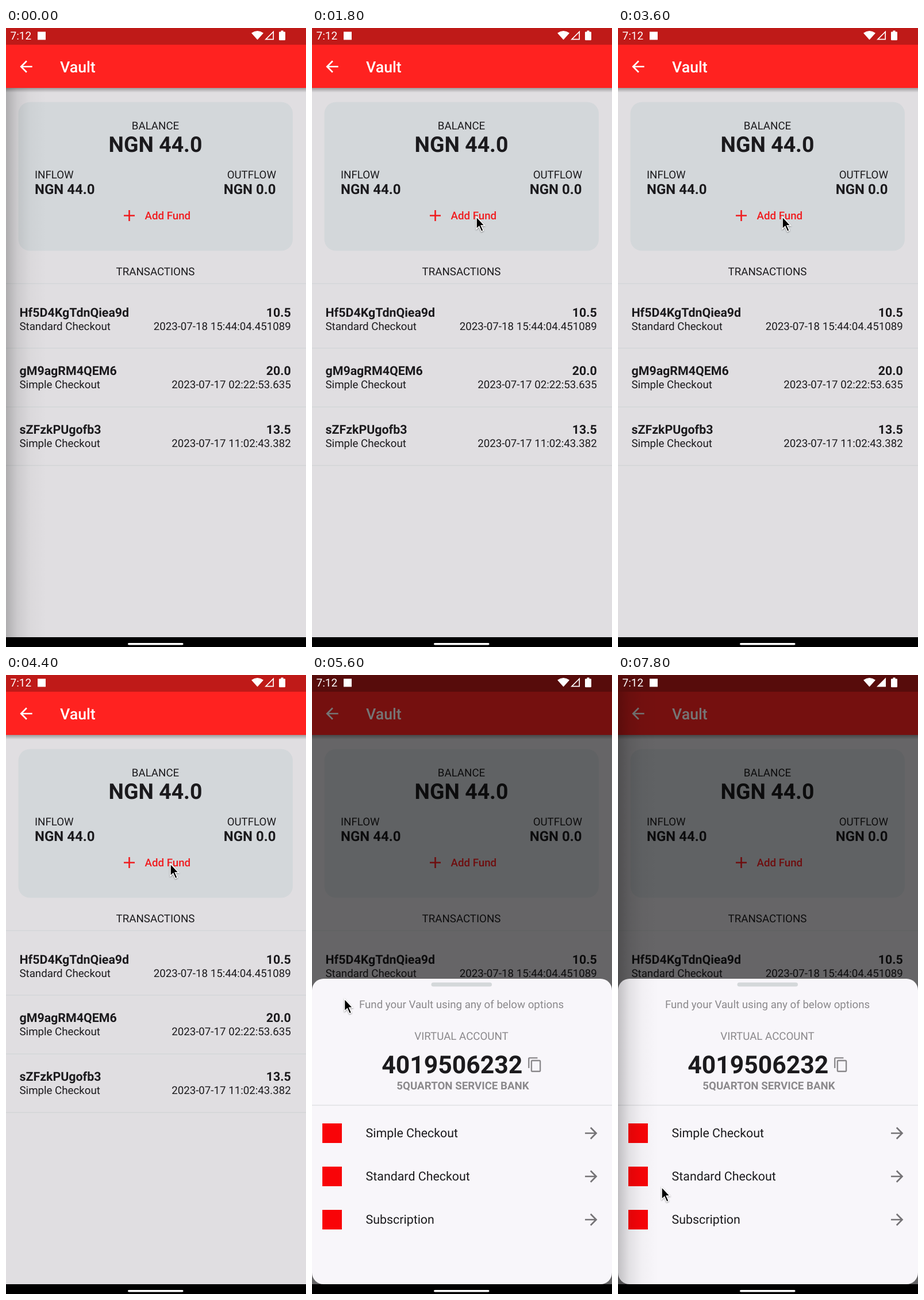
Recreate the animation shown at these times as an HTML page. Size 522 by 1074 pixels, loop 8000 ms.

```html
<!DOCTYPE html>
<html lang="en">
<head>
<meta charset="utf-8">
<title>Vault</title>
<style>
html, body { margin: 0; width: 100%; height: 100%; overflow: hidden; background: #000; }
svg { display: block; width: 522px; height: 1074px; font: 18.7px Roboto, sans-serif; text-rendering: geometricPrecision; }
text { fill: #1b1a1d; }
.b { font-weight: 700; }
.m { font-weight: 500; }
.mid { text-anchor: middle; }
.end { text-anchor: end; }
.s21 { font-size: 21.36px; }
.s24 { font-size: 24px; }
.s37 { font-size: 37.4px; }
.s43 { font-size: 42.7px; }
.grey { fill: #8b898c; }
.red { fill: #f01c1f; }
.white { fill: #fff; }
</style>
</head>
<body>
<svg viewBox="0 0 522 1074">
  <defs>
    <linearGradient id="barShade" x2="0" y2="1">
      <stop stop-opacity=".3"/><stop offset="1" stop-opacity="0"/>
    </linearGradient>
    <linearGradient id="edgeShade">
      <stop stop-opacity=".22"/><stop offset=".28" stop-opacity=".09"/>
      <stop offset=".6" stop-opacity=".025"/><stop offset="1" stop-opacity="0"/>
    </linearGradient>
    <path id="next" d="M12 4l-1.41 1.41L16.17 11H4v2h12.17l-5.58 5.59L12 20l8-8z" transform="scale(1.335)"/>
  </defs>

  <rect width="522" height="1057" fill="#e0dee1"/>
  <rect y="104" width="522" height="8" fill="url(#barShade)"/>
  <rect width="522" height="104" fill="#ff2220"/>
  <rect width="522" height="29" fill="#bf1a18"/>
  <use href="#next" class="white" transform="translate(51 51) scale(-1 1)"/>
  <text x="94" y="76.5" class="m white" font-size="26.7">Vault</text>

  <rect x="21.5" y="128.5" width="477.5" height="258" rx="20" fill="#d3d7da"/>
  <text x="260" y="175.5" class="mid">BALANCE</text>
  <text x="260" y="215" class="mid b s37">NGN 44.0</text>
  <text x="50" y="261">INFLOW</text>
  <text x="50" y="288" class="b s24">NGN 44.0</text>
  <text x="470" y="261" class="end">OUTFLOW</text>
  <text x="469.5" y="288" class="end b s24">NGN 0.0</text>
  <path d="M205 325.5h19M214.5 316v19" stroke="#f01c1f" stroke-width="2.6"/>
  <text x="241.5" y="332" class="m red">Add Fund</text>
  <text x="260" y="428.5" class="mid">TRANSACTIONS</text>
  <path d="M0 443.5H522M0 555.5H522M0 657.5H522M0 759H522" stroke="#d3d5d8" stroke-width="1.4"/>
  <g id="list"></g>

  <rect id="scrim" width="522" height="1057" fill-opacity=".54"/>
  <g id="sheet">
    <rect y="527" width="522" height="530" rx="20" fill="#f8f6fa"/>
    <rect x="207.5" y="533.5" width="105.5" height="7" rx="3.5" fill="#d4d8da"/>
    <text x="260" y="578" class="mid grey">Fund your Vault using any of below options</text>
    <text x="260" y="632.5" class="mid grey">VIRTUAL ACCOUNT</text>
    <text x="243.7" y="691.3" class="mid b s43">4019506232</text>
    <path class="grey" transform="translate(373.7 662) scale(1.17)" d="M16 1H4c-1.1 0-2 .9-2 2v14h2V3h12V1zm3 4H8c-1.1 0-2 .9-2 2v14c0 1.1.9 2 2 2h11c1.1 0 2-.9 2-2V7c0-1.1-.9-2-2-2zm0 16H8V7h11v14z"/>
    <text x="262.5" y="718.5" class="mid b grey">5QUARTON SERVICE BANK</text>
    <path d="M0 746.5H522" stroke="#e0e0e3" stroke-width="1.3"/>
    <g id="options"></g>
  </g>
  <rect id="edge" width="70" fill="url(#edgeShade)"/>

  <g class="white">
    <text x="7.5" y="20" font-size="19" class="white">7:12</text>
    <rect x="55" y="6.5" width="14" height="14"/>
    <path d="M427 8.7Q437.5 1.5 448 8.7L437.5 20.5z"/>
    <path id="signal" d="M465.2 6.5V19.7H452z" stroke="#fff" stroke-width="1.7"/>
    <path d="M478.5 4.5h4v2h2.3q1.2 0 1.2 1.2v12.3q0 1.2-1.2 1.2h-8.6q-1.2 0-1.2-1.2V7.7q0-1.2 1.2-1.2h2.3z"/>
  </g>
  <rect y="1057" width="522" height="17"/>
  <rect x="212" y="1067" width="96.5" height="3.4" rx="1.7" fill="#fff"/>
  <path id="cursor" d="M0 0V21.3L4.8 16.8 8.7 25.6 12.2 24 8.3 15.3H14.4z" stroke="#fff" stroke-width="1.5"
    style="filter: drop-shadow(0 1px 1px #0006)"/>
</svg>

<script>
const $ = id => document.getElementById(id);

const entries = [
  ["Hf5D4KgTdnQiea9d", "10.5", "Standard Checkout", "2023-07-18 15:44:04.451089"],
  ["gM9agRM4QEM6", "20.0", "Simple Checkout", "2023-07-17 02:22:53.635"],
  ["sZFzkPUgofb3", "13.5", "Simple Checkout", "2023-07-17 11:02:43.382"]
];
$("list").innerHTML = entries.map(([ref, amount, kind, date], i) => `
  <g transform="translate(0 ${i * 101.8})">
    <text x="23.5" y="500.5" class="b s21">${ref}</text>
    <text x="495.7" y="500.5" class="end b s21">${amount}</text>
    <text x="23.5" y="523.5">${kind}</text>
    <text x="495.7" y="523.5" class="end">${date}</text>
  </g>`).join("");

$("options").innerHTML = ["Simple Checkout", "Standard Checkout", "Subscription"].map((name, i) => `
  <g transform="translate(0 ${i * 75})">
    <rect x="18" y="778" width="34" height="34" fill="#f90408"/>
    <text x="93.6" y="802" class="s21">${name}</text>
    <use href="#next" x="469.7" y="779" fill="#757376"/>
  </g>`).join("");

// Pointer moves: start, end, from x, y, to x, y
const moves = [
  [1000, 1800, 12.5, 810, 286, 327.5],
  [5400, 5800, 286, 327.5, -20, 640],
  [7600, 7800, 6, 936, 76, 888.5]
];

function pointer(t) {
  const move = moves.filter(m => t >= m[0]).pop();
  if (!move) return [-40, 0];
  const [start, end, x0, y0, x1, y1] = move;
  const p = Math.min(1, (t - start) / (end - start));
  const ease = 1 - (1 - p) ** 2;
  return [x0 + (x1 - x0) * ease, y0 + (y1 - y0) * ease];
}

function show(id, on) {
  $(id).style.display = on ? "" : "none";
}

function draw() {
  const t = Math.floor(performance.now() % 8000 / 200) * 200;
  const open = t >= 4600;
  show("scrim", open);
  show("sheet", open);
  show("edge", t < 1200 || t >= 5800);
  const top = open ? 29 : 104;
  $("edge").setAttribute("y", top);
  $("edge").setAttribute("height", 1057 - top);
  $("signal").setAttribute("fill", t >= 5800 ? "#fff" : "none");
  $("cursor").setAttribute("transform", `translate(${pointer(t)})`);
  requestAnimationFrame(draw);
}
draw();
</script>
</body>
</html>
```
